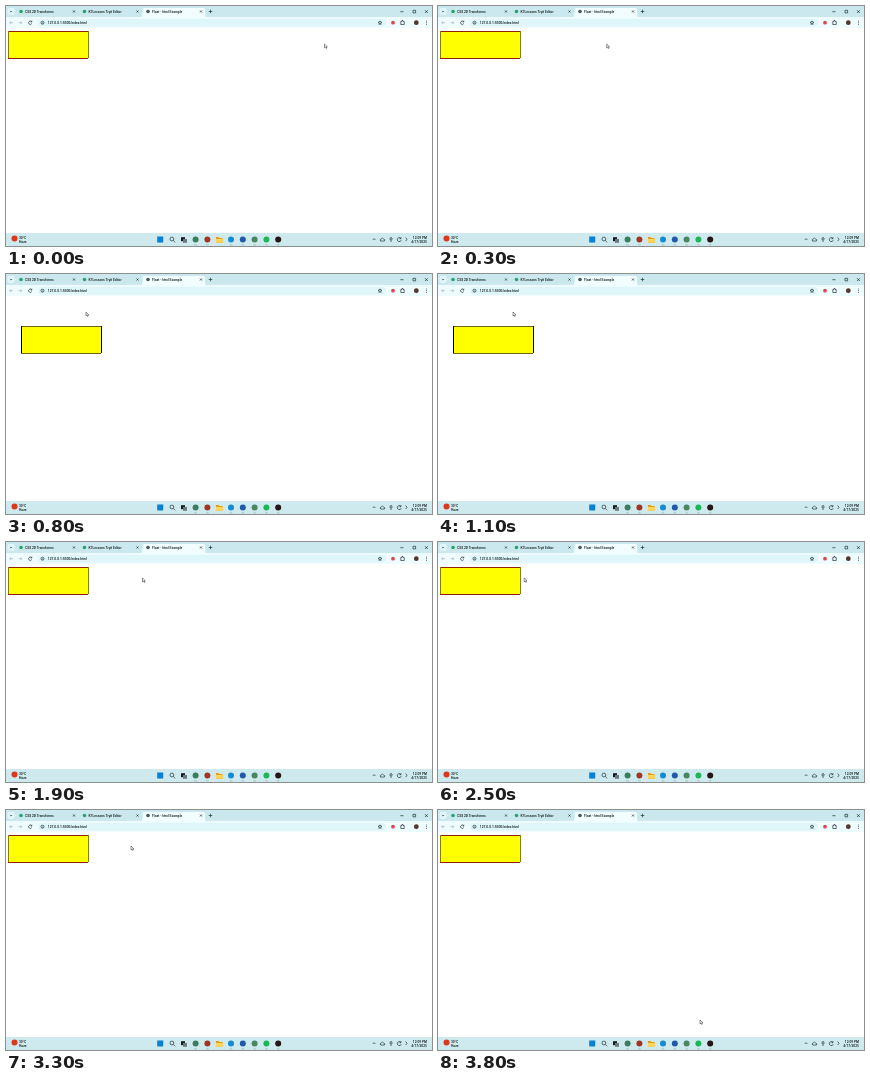
An HTML page for the animation above (3.9 s loop, 426x240 px).

```html
<!DOCTYPE html>
<html lang="en">
<head>
<meta charset="utf-8">
<title>Hover transform</title>
<style>
  html, body { margin: 0; width: 100%; height: 100%; overflow: hidden; background: #fff; }
  svg { display: block; width: 426px; height: 240px; }
  text { font: 500 3.3px Roboto, sans-serif; fill: #0c1719; }
  .line { fill: none; stroke: #162529; stroke-width: .65; }
  .faint { opacity: .35; }
  #box { --across: #8c2208; --down: #8a7d00; shape-rendering: crispEdges; }
  #box.hovered { --across: #6c6a08; --down: #000; transform: translate(13px, 27px); }
</style>
</head>
<body>
<svg viewBox="0 0 426 240">
  <!-- tab strip -->
  <rect width="426" height="11" fill="#cae8ed"/>
  <rect x="1.5" y="2" width="7" height="7" rx="2" fill="#e2f6f9"/>
  <path d="M135 11q1.500 0 1.500-2V4q0-2 2-2h58.500q2 0 2 2v5q0 2 1.500 2z" fill="#f2fdff"/>
  <path class="line" d="M3.900 5L5 6.100 6.100 5M204.500 3.700v3.600M202.700 5.500h3.600M394.300 5.700h3.200M407 4.300h2.600v2.600H407zM419 4.200l2.800 2.800m0-2.800L419 7"/>
  <g id="tabs"></g>

  <!-- toolbar -->
  <rect y="11" width="426" height="11" fill="#effcff"/>
  <rect x="32" y="13" width="348" height="7.500" rx="3.700" fill="#def5f9"/>
  <path class="line faint" d="M7 16.700H3.800m1.300-1.300l-1.300 1.300 1.300 1.300M12.500 16.700h3.200m-1.300-1.300l1.300 1.300-1.300 1.300"/>
  <path class="line" d="M25.700 15.800a1.700 1.700 0 1 0 .1 1.700M25.800 14.700v1.300h-1.300M36.500 16.500v1"/>
  <circle class="line" cx="36.500" cy="16.700" r="1.500"/>
  <text x="41.800" y="18">127.0.0.1:5500/index.html</text>
  <path class="line" d="M374 14.900l.5 1.200 1.300.1-1 .9.300 1.300-1.100-.7-1.100.7.300-1.300-1-.9 1.300-.1zM394.800 15.400h1.200v-.8h1v.8h1.200v3.100h-3.400z"/>
  <circle cx="387" cy="16.700" r="1.900" fill="#d94b50"/>
  <circle cx="410.300" cy="16.700" r="2.400" fill="#54372f"/>
  <path class="line" d="M420.500 14.500v4.500" stroke-dasharray=".9 .8"/>

  <!-- hovered box -->
  <g id="box">
    <path d="M2 25h80v27H2z" fill="#ff0"/>
    <path d="M2 25.500h80M2 52.500h80" stroke="var(--across)"/>
    <path d="M2.500 25v27M82.500 25v27" stroke="var(--down)"/>
  </g>

  <!-- taskbar -->
  <rect y="227" width="426" height="13" fill="#cfeaee"/>
  <circle cx="8.500" cy="232.500" r="3" fill="#d8391f"/>
  <text x="13" y="232.800">30°C</text>
  <text x="13" y="237.300">Haze</text>
  <g id="apps"></g>
  <circle class="line" cx="165.900" cy="233" r="1.900"/>
  <path class="line" d="M167.300 234.500l1.800 1.800"/>
  <path d="M175 231.200h4v4h-4z" fill="#141c1e"/>
  <path d="M177 233h4v3.800h-4z" fill="#6c7d82"/>
  <path d="M210 231h2.600l.8.900h3.200v4.900H210z" fill="#e0a01d"/>
  <path d="M210 233h6.600v3.800H210z" fill="#ffd45a"/>
  <path class="line" d="M366.700 234l1.400-1.400 1.400 1.400M374.500 235h4q1-1.500-.8-1.900-1-1.900-2.400-.3-1.700.3-.8 2.200M384 232q1-1 2 0v1.700q-1 1-2 0zM385 234.500v1.500M394.800 232.300a2 2 0 1 0 .4 1.800M395 231.200v1.500h-1.500M399.600 231.500l1.400 1.800-1.400 1.800"/>
  <text x="421" y="232.800" text-anchor="end">12:09 PM</text>
  <text x="421" y="237.300" text-anchor="end">4/17/2025</text>

  <path id="cursor" d="M0 0v3.900l.9-.8.700 1.400.7-.4-.6-1.300h1.200z" fill="#fff" stroke="#20292c" stroke-width=".5"/>
</svg>
<script>
const LOOP = 3900, STEP = 100;
const byId = id => document.getElementById(id);
const box = byId('box'), cursor = byId('cursor');

const titles = ['CSS 2D Transforms', 'K7Lessons Tryit Editor', 'Float - html Example'];
byId('tabs').innerHTML = titles.map((title, i) => {
  const x = 15 + 63.500 * i;
  return `<circle cx="${x}" cy="5.500" r="1.800" fill="${i < 2 ? '#25a56a' : '#47575b'}"/>
    <text x="${x + 4}" y="6.700">${title}</text>
    <path class="line" d="M${x + 52} 4.500l2 2m0-2l-2 2"/>`;
}).join('');

// Evenly spaced taskbar slots; empty ones hold the drawn system icons.
const apps = ['#0a80d2', '', '', '#397f5b', '#a33426', '', '#178bd1', '#2459a9', '#49875e', '#20b45a', '#251418'];
byId('apps').innerHTML = apps.map((color, i) => {
  const x = 154.200 + 11.800 * i;
  if (!color) return '';
  const mark = i ? `<circle cx="${x}" cy="233.500" r="3" fill="${color}"/>`
    : `<rect x="${x - 3}" y="230.500" width="6" height="6" fill="${color}"/>`;
  return mark + (i > 2 ? `<path class="line faint" d="M${x - 1.300} 238.900h2.600"/>` : '');
}).join('');

const strokes = [
  { start: 0, end: 1100, from: [318.500, 38], to: [75, 38] },
  { start: 1900, end: 2200, from: [136.500, 36], to: [136.500, 36] },
  { start: 2200, end: 2800, from: [136.500, 36], to: [79, 35] },
  { start: 3300, end: 3800, from: [125, 36], to: [262, 210] }
];

// Each sweep slows sideways and gathers speed vertically.
function pointerAt(t) {
  const { start, end, from, to } = strokes.findLast(s => s.start <= t);
  const k = Math.min((t - start) / (end - start), 1);
  const mix = (axis, amount) => from[axis] + (to[axis] - from[axis]) * amount;
  return [mix(0, 1 - (1 - k) ** 3), mix(1, k ** 4)];
}

function draw(now) {
  const t = Math.floor(now % LOOP / STEP) * STEP;
  const [x, y] = pointerAt(t);
  cursor.setAttribute('transform', `translate(${x} ${y})`);
  box.classList.toggle('hovered', x < 83);
}

const start = performance.now();
(function tick() {
  draw(performance.now() - start);
  requestAnimationFrame(tick);
})();
</script>
</body>
</html>
```
